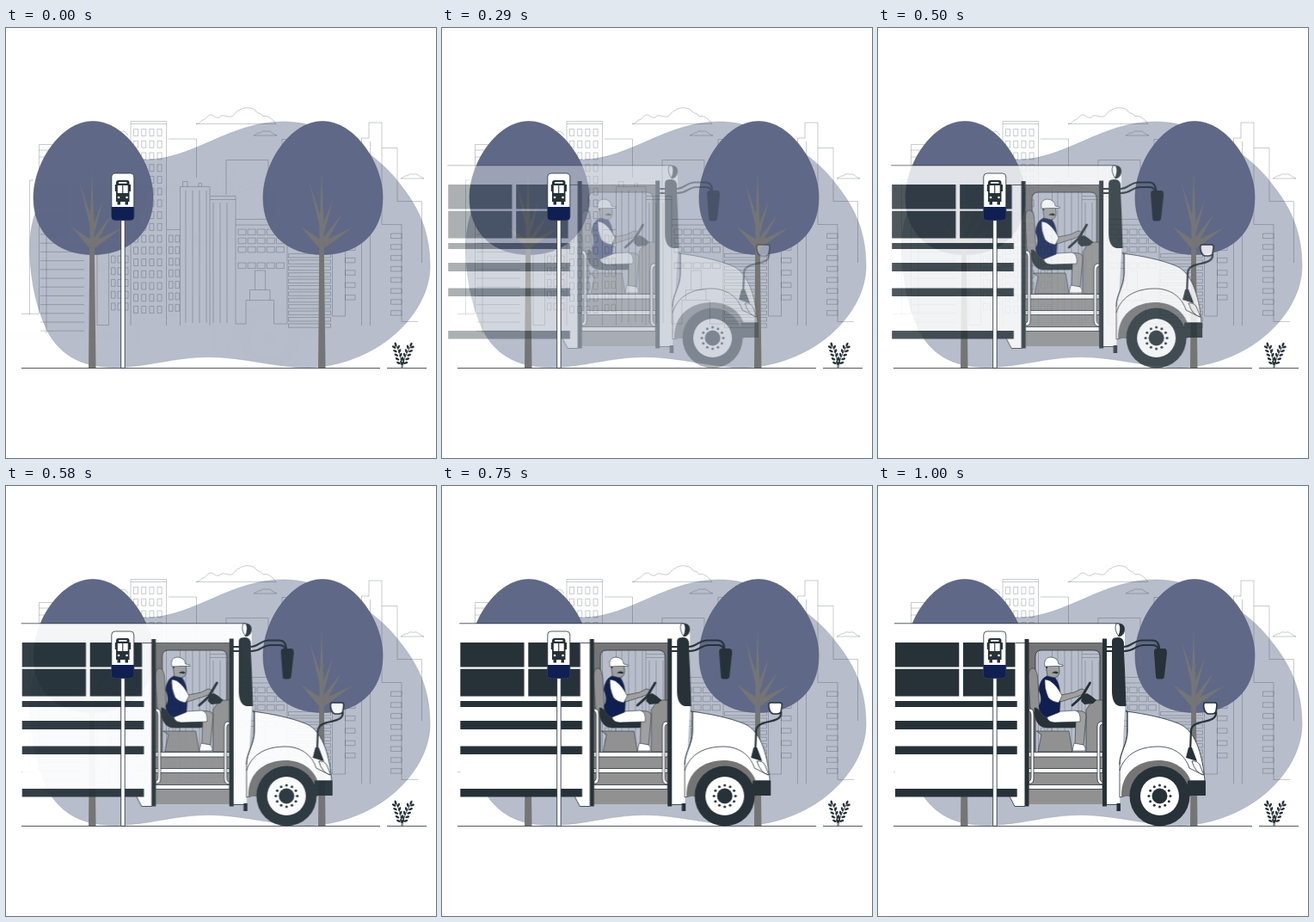
An HTML page that plays this animation: 500x500 px, repeating every 1.04 s.

```html
<!DOCTYPE html>
<html lang="en">
<head>
<meta charset="utf-8">
<title>Bus stop</title>
<style>
  html, body { margin: 0; width: 100%; height: 100%; overflow: hidden; background: #fff; }
  svg { display: block; width: 100vw; height: 100vh; }
  .city { fill: none; stroke: #263238; stroke-opacity: .36; stroke-width: .7; }
  .dark { fill: #263238; }
  .gray { fill: #757575; }
  .mid { fill: #919191; }
  .skin { fill: #a0a0a0; }
  .navy { fill: #0f1f52; }
  .line { fill: none; stroke: #263238; stroke-width: .8; }
  .white { fill: #fff; stroke: #263238; stroke-width: .8; }
  .arm { fill: none; stroke: #263238; stroke-width: 2.2; stroke-linecap: round; }
  #bus { opacity: 0; }
</style>
</head>
<body>
<svg viewBox="0 0 500 500">
  <defs>
    <g id="tree">
      <path fill="#5f6987" stroke="#4f5874" stroke-width=".6" d="M101 108.5C139 108.5 171 158 171 197C171 239 142 263.5 101 263.5C60 263.5 32 239 32 197C32 158 63 108.5 101 108.5Z"/>
      <path class="gray" d="M96 395.500L97.500 230L100 167L102.500 230L104.500 395.500Z"/>
      <path class="gray" d="M98 232L86 181L101 225ZM97 256L76 231L100 247ZM101 230L113 200L103 238ZM102 244L123 217L104 252ZM102 248L136 232L103 256Z"/>
    </g>
  </defs>

  <path fill="#b7bdca" stroke="#9ba1b0" stroke-width=".5" d="M28 248C29 222 38 200 52 182C80 148 130 154 165 153C218 152 261 109 322 109C380 109 437 151 460 184C482 212 493 240 493 277C493 330 436 391 352 395C315 395 275 382.500 236 382.500C195 382.500 165 394.500 126 394.500C85 394.500 60 378 46 348C33 318 27 285 28 248Z"/>

  <g class="city">
    <path d="M221 111.500C225 111 227 109 228 107C232 108 234 101 238 101C242 101 243 105 248 104C252 99 256 104 262 103C266 102 267 96 271 96C274 92 287 91 291 97C292 100 297 98 299 103C304 101 309 105 314 111.500Z"/>
    <path id="puff" d="M288 125C291 124 293 121 296 122C299 118 302 121 304 120C308 119 309 123 315 125Z"/>
    <use href="#puff" x="171" y="50"/>
    <path d="M38.500 332.500V135.500H56M38.500 142H52M38.500 150H47M47 150V355M32 177H27.500V333M18 332.500H38M106 250V345.500H119.500V250"/>
    <path d="M145 346V108.500H186.500V346M145 111.500H186.500M132 122Q138 117 142 125M189 129H221.500V174M187 234.500H202.500M202.500 346V184.500H237V195M205.500 184.500V178.500H211V184.500M224 184.500V180.500H227.500V184.500M237 195.500H267V199.500H237ZM237 199.500V346M267 199.500V344M256 194V153.500H305V180M321 137V129.500H328"/>
    <path d="M267 222.500H327M267 229H327V344H311.500V316.500H307V304.500H301.500V282H289.500V304.500H283.500V316.500H279V344H267M283.500 316.500H307M289.500 304.500H301.500"/>
    <path d="M379.500 255V335H394.500V250M413.500 346V128H422V110H437V228.500H460V341.500H479M423.500 346V132M437 139.500H455V201.500H483.500V273"/>
    <path id="windows"/>
  </g>

  <use href="#tree"/>
  <use href="#tree" x="267"/>

  <g id="bus">
    <path fill="#fff" d="M20 160H278L287 168V260L281 370H266V183H175V372H159L153 361H20Z"/>
    <path class="line" d="M19 159.800H280M160 182.500H266M153 361L159 372.500H171M266 370.500H281"/>
    <path class="dark" id="stripes"/>
    <path fill="#fff" d="M20 210.500H160V212.700H20ZM94.300 182H99V245H94.300Z"/>

    <!-- doorway, open to the city -->
    <path class="gray" fill-rule="evenodd" d="M175 183H261V309H175ZM190 191Q183 191 183 198V309H258V198Q258 191 251 191Z"/>
    <path class="line" d="M183 309V198Q183 191 190 191H251Q258 191 258 198V250"/>
    <path class="mid" d="M175 309H261V370H175Z"/>
    <path class="white" d="M175 309.500H261V315H175ZM175 328.500H261V333.500H175ZM175 347.500H261V352.500H175Z"/>

    <!-- driver -->
    <g stroke="#263238" stroke-width=".6">
      <path class="mid" d="M242 260L250 249H261V309H242Z"/>
      <path class="mid" d="M184 285H222L226 309H186L190 289Z"/>
      <path class="mid" d="M179 212C184 211 186 219 186 229L188 264Q181 266 177 258L175 222Q175 213 179 212Z"/>
      <path class="dark" d="M182 258C188 257 188 267 198 270L235 275Q235 281 226 281H196Q185 281 182 266Z"/>
      <path class="skin" d="M228 262Q242 260 242 267L239 301H229L230 274Z"/>
      <path fill="#fff" d="M228 299L239 301Q242 304 241 308H226Z"/>
      <path fill="#fff" d="M197 263L229 261Q236 262 235 274L205 275Q194 274 197 263Z"/>
      <path class="navy" d="M196 221L205 222C213 230 213 248 211 263L196 269Q188 266 187 256Q192 249 187 237Q188 225 196 221Z"/>
      <path class="skin" d="M208 244L228 240L236 236Q242 236 241 241L231 245L212 251Z"/>
      <path fill="#fff" d="M194 225C202 225 209 234 214 244L210 252Q202 251 198 246Q193 235 194 225Z"/>
      <path class="skin" d="M195 207H210L211 215Q211 222 205 223L197 221Z"/>
      <path class="dark" stroke="none" d="M202 217.500Q206 214 210 217L208 218.500Q205 217.500 202 217.500ZM195 209H197.500L196.500 213Z"/>
      <path fill="#fff" d="M194 210Q192 200 200 199Q209 199 210 207L215 208V209.500H204Z"/>
    </g>
    <path class="dark" d="M238 243L243 241L248 244L254 249L250 253L240 254L236 250Z"/>
    <path class="arm" style="stroke-width:2.800" d="M246.500 229L237 245L226 255"/>

    <path class="white" d="M175.500 259Q181 258 181 265V340Q181 347 175.500 346V343Q178 343 178 339V267Q178 262 175.500 262Z"/>
    <path class="white" d="M261 274Q255 273 255 280V340Q255 347 261 347V344Q258 344 258 339V281Q258 277 261 277Z"/>
    <path class="dark" d="M170.500 178H175.500V372.500H170.500ZM261 177.500H266V372.500H261ZM277.500 369H282V378H277.500Z"/>

    <!-- cab front -->
    <path class="white" d="M277 160Q286 159 286.500 166Q287 174 280 175Q274 167 277 160Z"/>
    <path class="dark" d="M280 160Q287 160 286.500 167Q286 174 279 175Q283 167 280 160Z"/>
    <path class="dark" d="M275 176.500Q286 174 286 184L288.500 256H281Q272 254 272 238V181Q272 177 275 176.500Z"/>
    <path class="white" d="M288 262C312 265 334 270 349 276C368 283 377 309 380 343H362L281 362V322C281 310 290 300 290 285V262Z"/>
    <path class="line" d="M290 262V285C290 301 281 310 281 324M281 331C287 311 305 303 326 303C343 303 357 312 362 328L378 336"/>
    <path class="white" d="M365 320Q371 319 374 324L379 336Q369 334 365 320Z"/>
    <path class="gray" d="M283 361C282 333 303 319 326 319C345 319 359 329 364 344V361Z"/>
    <path class="dark" d="M360 342.500H381V360H360Z"/>
    <circle class="dark" cx="327.500" cy="360.500" r="35"/>
    <circle cx="327.500" cy="360.500" r="22.500" fill="#fff"/>
    <circle class="dark" cx="327.500" cy="360.500" r="9"/>
    <g class="dark" id="bolts"></g>

    <path class="arm" d="M266 187H285C295 187 296 180 306 179.500H319Q327 179.500 327 190M266 192H287C298 192 299 185 309 185H319Q325 185 326 190"/>
    <path class="dark" d="M324 189H333Q336 189 336 194L333 221Q333 224.500 329 224.500H326Q323 224.500 323 221L321 194Q320.500 189 324 189Z"/>
    <path class="arm" d="M393 263C394 278 366 270 364 284L363 310"/>
    <path class="dark" d="M361 304H365L371 320L358 316Z"/>
    <path class="white" style="stroke-width:1.600" d="M380 252H392Q394 252 394 255L393 262Q392 265 388 265H384Q380 264 379 258Q378 253 380 252Z"/>
  </g>

  <path class="line" d="M18 395.500H435M443 395.500H489"/>
  <g id="plant" class="dark"><path class="line" d="M460 395C460 383 457 375 453 368M461 395C462 384 467 377 471 369"/></g>

  <!-- stop sign -->
  <path fill="#fff" stroke="#1d2440" stroke-width=".8" d="M133.700 222H138.200V395.500H133.700Z"/>
  <rect x="122.800" y="169" width="26" height="54.500" rx="4" class="white"/>
  <path class="navy" d="M122.800 208H148.800V219.500Q148.800 223.500 144.800 223.500H126.800Q122.800 223.500 122.800 219.500Z"/>
  <path class="dark" d="M131 177H141Q143.500 177 143.500 180V182H145V190H143.500V202H142V205.500H138.500V202H133V205.500H129.500V202H128V190H126.800V182H128V180Q128 177 131 177Z"/>
  <path fill="#fff" d="M131 179H140.500V180.700H131ZM129.800 183H135.200V192H129.800ZM136.300 183H141.700V192H136.300Z"/>
  <g fill="#fff"><circle cx="131" cy="197" r="1.300"/><circle cx="140.500" cy="197" r="1.300"/></g>
</svg>

<script>
const $ = id => document.getElementById(id);
const box = (x, y, w, h) => `M${x} ${y}h${w}v${h}h${-w}Z`;

// columns x rows of equal boxes
function grid(x, y, cols, rows, dx, dy, w, h) {
  let d = '';
  for (let r = 0; r < rows; r++)
    for (let c = 0; c < cols; c++) d += box(x + c * dx, y + r * dy, w, h);
  return d;
}

let city = grid(148.5, 117.5, 4, 16, 9.2, 13.73, 5, 8)
  + grid(122.5, 265, 3, 5, 7.5, 13.73, 4.5, 8)
  + grid(189.5, 241, 2, 7, 7.5, 13.4, 4.5, 8)
  + grid(270, 234, 5, 3, 11.1, 10.2, 9, 6.5)
  + grid(270, 273, 5, 1, 11.1, 0, 9, 6.5)
  + grid(328.5, 262.5, 1, 12, 0, 7.4, 49, 4.4)
  + grid(394.5, 253, 1, 5, 0, 14.4, 11.5, 5.5)
  + grid(447.5, 239, 1, 8, 0, 12.8, 12.5, 5.5);
for (let y = 240; y < 356; y += 10.2) city += `M40 ${y}H91`;
for (let x = 209; x < 234; x += 8) city += `M${x} 189V343`;
for (let x = 241; x < 260; x += 8) city += `M${x} 203V343`;
$('windows').setAttribute('d', city);

$('stripes').setAttribute('d', box(20, 182, 139.5, 62.5) +
  [[250, 7], [273, 10], [302.5, 9.5], [352, 9.5]]
    .map(([y, h]) => box(20, y, 141.7, h)).join(''));

function add(parent, tag, attrs) {
  const el = document.createElementNS('http://www.w3.org/2000/svg', tag);
  for (const k in attrs) el.setAttribute(k, attrs[k]);
  $(parent).append(el);
}

for (let i = 0; i < 12; i++) {
  const a = i * Math.PI / 6;
  add('bolts', 'circle', { cx: 327.5 + 12.5 * Math.cos(a), cy: 360.5 + 12.5 * Math.sin(a), r: 1.5 });
}

function leaf(cx, cy, turn) {
  add('plant', 'ellipse', { cx, cy, rx: 2.5, ry: 1.3, transform: `rotate(${turn} ${cx} ${cy})` });
}

// leaf pairs along both stems, with one at each tip
for (const [x, dx, tilt] of [[453, 1.3, -18], [471, -1.9, 25]]) {
  leaf(x, 368, 90 + tilt);
  for (let i = 0; i < 5; i++)
    for (const side of [-1, 1])
      leaf(x + dx * (i + .6) + side * 2.6, 371 + i * 4.6, tilt - side * 45);
}

const LOOP = 1040, LEAD = 40;
const ride = $('bus').animate(
  [{ transform: 'translateX(-21px)', opacity: 0 }, { transform: 'translateX(0px)', opacity: 1 }],
  { duration: 1000, fill: 'both', easing: 'cubic-bezier(.36, -.01, .5, 1.38)' });
ride.pause();

const start = performance.now();
function draw() {
  ride.currentTime = (performance.now() - start) % LOOP + LEAD;
  requestAnimationFrame(draw);
}
draw();
</script>
</body>
</html>
```
